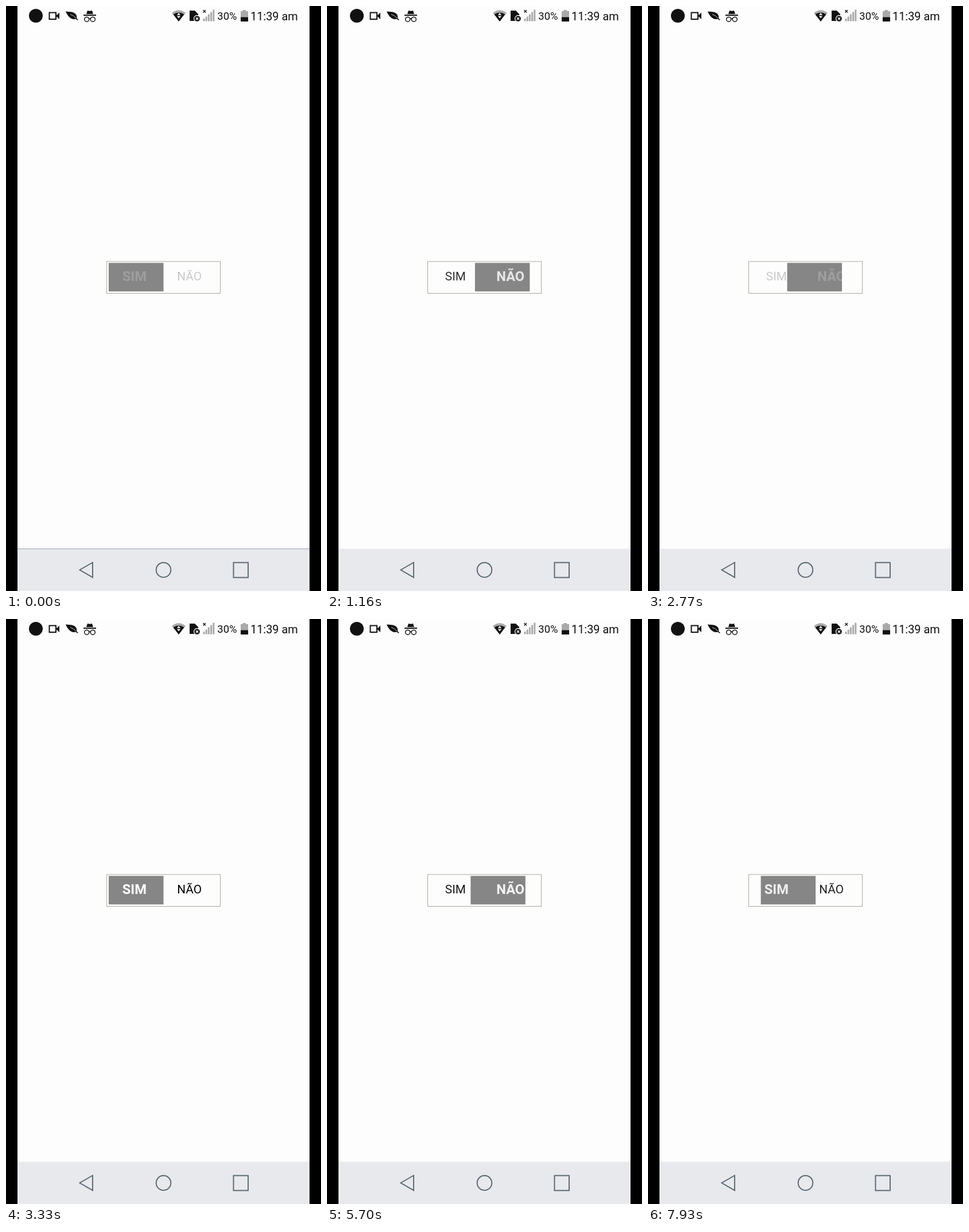
Animation, 549 px wide and 1019 px high, one loop 8000 ms. Source, as an HTML page:

```html
<!DOCTYPE html>
<html lang="pt">
<head>
<meta charset="utf-8">
<style>
  html, body { margin: 0; width: 100%; height: 100%; overflow: hidden; background: #000; }
  svg { display: block; width: 549px; height: 1019px; }
  text { font-family: Roboto, sans-serif; }
  .label { text-anchor: middle; font-size: 20.8px; }
  .label.on { font-size: 23.7px; font-weight: 700; fill: #fff; }
</style>
</head>
<body>
<svg viewBox="0 0 549 1019">
  <rect x="20" width="509" height="1019" fill="#fdfdfd"/>

  <!-- status bar -->
  <g fill="#111">
    <circle cx="52" cy="17" r="12"/>
    <path d="M75.5 11.5h11.5v11.5h-11.5z" fill="none" stroke="#111" stroke-width="2"/>
    <path d="M87 17.2l6-5.7v11.5z"/>
    <path d="M104 9.5C112 10 121 10 123 17q.6 3 .2 4.500l2.800 2.500-1.500.8-3-2.300C114 24.500 108 19 104 9.500z"/>
    <path d="M112 14.500q6 2 10 6.500" fill="none" stroke="#fdfdfd" stroke-width=".8"/>
    <path d="M140 14l2-6 4 .7 4-.7 2 6zM135 15h22v2h-22z"/>
    <g fill="none" stroke="#111" stroke-width="1.5">
      <circle cx="140.700" cy="23.200" r="4"/>
      <circle cx="151.300" cy="23.200" r="4"/>
      <path d="M144.700 22.500q1.300-1 2.600 0"/>
    </g>
    <path d="M289 12q12-9.500 24 0l-12 15z" fill="#aaa"/>
    <path d="M291.500 14.500q9.500-6 19 0L301 27z"/>
    <path d="M297.800 15.700l3.200-3.700 3.200 3.700zM297.800 17.500h6.400l-3.200 3.700z" fill="#fdfdfd"/>
    <path d="M320 8h9l6 6v12h-15z"/>
    <circle cx="333" cy="22" r="5.500" stroke="#fdfdfd" stroke-width="1.300"/>
    <path d="M331 20l4 4m0-4l-4 4" stroke="#fdfdfd" stroke-width="1.300"/>
    <path d="M343.500 7l4.500 4.500m0-4.500l-4.500 4.500" stroke="#111" stroke-width="1.300"/>
    <path d="M343.500 22h3v4.500h-3zM347.700 18.500h3v8h-3zM351.900 14.500h3v12h-3zM356.100 10.500h3v16h-3zM360.300 6.500h3v20h-3z" fill="#aaa"/>
    <text x="368.300" y="24" font-size="18.400">30%</text>
    <path d="M409 9h3.500v-2h5.500v2h4v11h-13z" fill="#aaa"/>
    <path d="M409 19.500h13v7.500h-13z"/>
    <text x="426" y="24.500" font-size="19.900">11:39 am</text>
  </g>

  <!-- switch -->
  <rect x="175.500" y="445" width="198" height="55.500" fill="none" stroke="#a9a99d"/>
  <rect id="thumb" x="179" y="447.500" width="95.500" height="49.700" fill="#868686"/>
  <g id="labels">
    <text class="label" x="223.900" y="478">SIM</text>
    <text class="label" x="319.700" y="478">NÃO</text>
  </g>

  <!-- navigation bar -->
  <rect x="20" y="945.500" width="509" height="74" fill="#e7e9ec"/>
  <path id="edge" d="M20 945.500h509" stroke="#9da2b8"/>
  <g fill="none" stroke="#58656f" stroke-width="1.900">
    <path d="M128.500 982.300l22.500-13v26z"/>
    <circle cx="274.500" cy="982.300" r="12.800"/>
    <rect x="396.500" y="969.500" width="25.500" height="26"/>
  </g>
</svg>
<script>
const LOOP = 8000, LAST = 7930, SLIDE = 850, FADE = 250, LEFT = 179, TRAVEL = 95;
// Each tap dims the labels, slides the thumb to a side, then swaps and restores the labels.
const taps = [
  { press: 0, slide: 533, release: 998, to: 1 },
  { press: 2360, slide: 2440, release: 2850, to: 0 },
  { press: 5090, slide: 5130, release: 5513, to: 1 },
  { press: 7250, slide: 7314, release: 7751, to: 0 }
];
const thumb = document.getElementById('thumb');
const labels = document.getElementById('labels');
const edge = document.getElementById('edge');

const clamp = v => Math.min(1, Math.max(0, v));
const mirror = ease => t => t < .5 ? ease(2 * t) / 2 : 1 - ease(2 - 2 * t) / 2;
const quad = mirror(t => t * t);

// cubic-bezier(.42, 0, 1, 1), solved by bisection
const slideEase = mirror(x => {
  let lo = 0, hi = 1;
  for (let i = 0; i < 24; i++) {
    const s = (lo + hi) / 2, u = 1 - s;
    if (1.26 * s * u * u + 3 * s * s * u + s * s * s < x) lo = s; else hi = s;
  }
  return lo * lo * (3 - 2 * lo);
});

function draw(t) {
  const tap = taps.findLast(p => p.press <= t);
  const p = slideEase(clamp((t - tap.slide) / SLIDE));
  const side = tap.to ? p : 1 - p;
  const active = t < tap.release ? 1 - tap.to : tap.to;

  thumb.setAttribute('x', LEFT + TRAVEL * side);
  labels.setAttribute('opacity', .2 + .8 * quad(clamp((t - tap.release) / FADE)));
  [...labels.children].forEach((label, i) => {
    label.classList.toggle('on', i === active);
    label.setAttribute('y', i === active ? 479 : 478);
  });
  edge.setAttribute('opacity', t < 500 ? 1 : 0);
}

const start = performance.now();
function tick() {
  draw(Math.min((performance.now() - start) % LOOP, LAST));
  requestAnimationFrame(tick);
}
tick();
</script>
</body>
</html>
```
